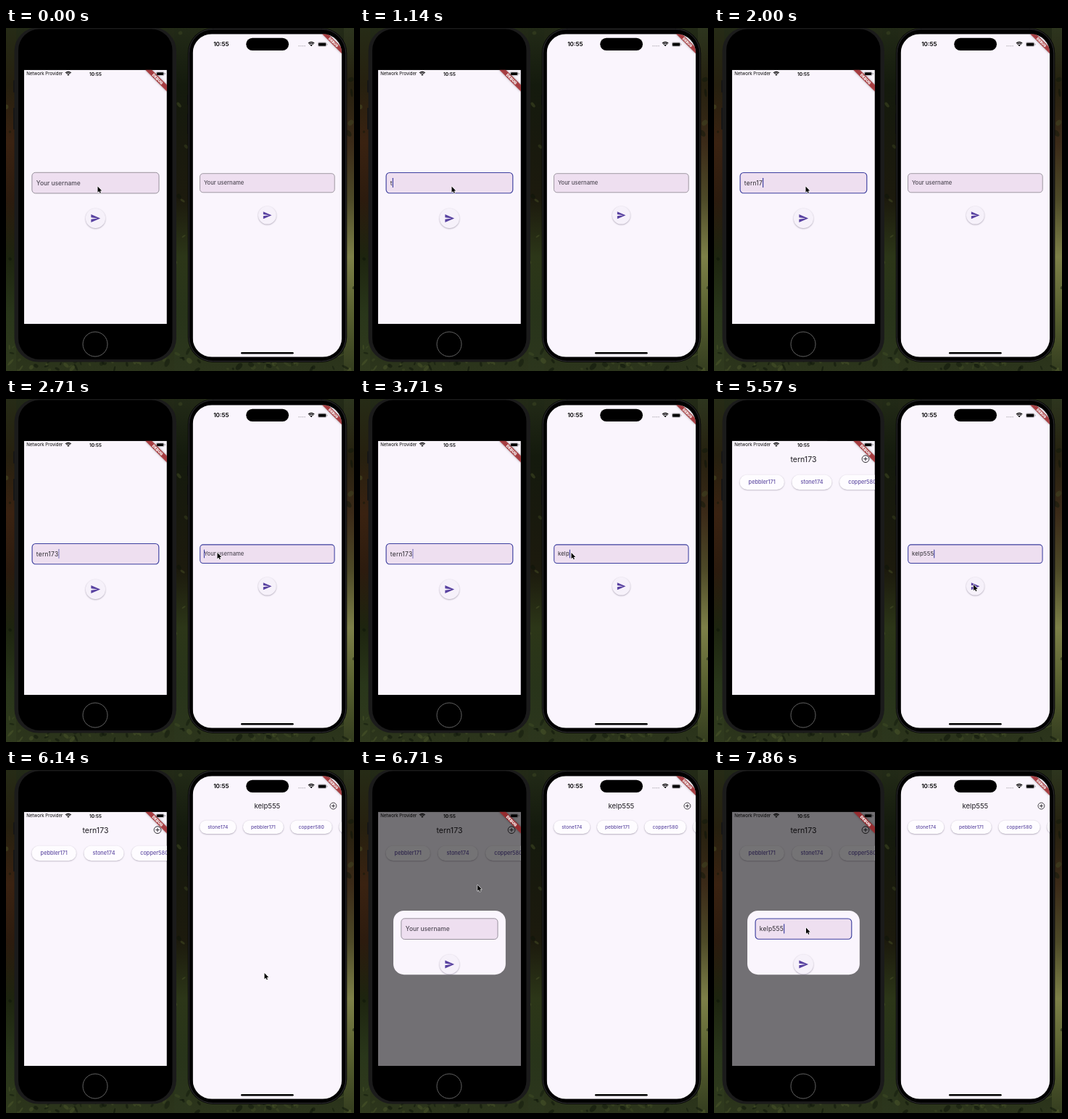
These frames come from a looping animation (480 by 473 pixels, 8000 ms). An HTML page with a canvas:

```html
<!DOCTYPE html>
<html lang="en">
<head>
<meta charset="utf-8">
<title>Two phones signing in</title>
<style>
  html, body { margin: 0; width: 100%; height: 100%; overflow: hidden; background: #14180c; }
  canvas { display: block; width: 480px; height: 473px; }
</style>
</head>
<body>
<canvas id="stage"></canvas>
<script>
const W = 480, H = 473, LOOP = 8000;
const canvas = document.getElementById('stage');
const ctx = canvas.getContext('2d');
const dpr = window.devicePixelRatio || 1;
canvas.width = W * dpr;
canvas.height = H * dpr;

const PAPER = '#faf5fd', INK = '#1d1b20', PURPLE = '#5841a0', INDIGO = '#3d3f9f';
const USERS = { a: 'tern173', b: 'kelp555' };
const CHIPS = { pebble: ['pebbler171', 117], stone: ['stone174', 105], copper: ['copper580', 120] };
const SEND = new Path2D('M2 21L23 12 2 3v7l15 2-15 2z');
const ARROW = new Path2D('M0 0V8.2L1.9 6.5 3.1 9.3 4.4 8.7 3.2 6H5.7Z');

// Phone screens: pixel origin, scale, and layout in points.
const PHONES = {
  left: { x: 25, y: 57.7, s: .525, w: 375, h: 667, r: 0, top: 20, fieldY: 269,
          user: USERS.a, input: { focus: 450, start: 1080, step: 178 }, push: 5120,
          chips: [CHIPS.pebble, CHIPS.stone, CHIPS.copper] },
  right: { x: 257.6, y: 8.2, s: .478, w: 430, h: 932, r: 55, top: 59, fieldY: 402,
           user: USERS.b, input: { focus: 2580, start: 3080, step: 190 }, push: 5580,
           chips: [CHIPS.stone, CHIPS.pebble, CHIPS.copper, ['', 105]] }
};
const DIALOG = { open: 6560, input: { focus: 6840, start: 6900, step: 145 } };

// Pointer tip: time, x, y
const POINTER = [
  [0, 126.5, 218.5], [2200, 126.5, 218.5], [2540, 291.5, 212], [4300, 291.5, 212],
  [4800, 128.5, 261.5], [5140, 128.5, 261.5], [5480, 358, 256], [5640, 358, 256],
  [5900, 356.5, 280], [6150, 356.5, 280], [6470, 208.5, 81], [6580, 208.5, 81],
  [6820, 127, 217.5], [LOOP, 127, 217.5]
];

const clamp = v => Math.max(0, Math.min(1, v));
const smooth = p => p * p * (3 - 2 * p);
const typed = (text, t, { start, step }) =>
  t < start ? '' : text.slice(0, Math.floor((t - start) / step) + 1);

// One-second blink that restarts on focus and on every key press.
function caretAlpha(t, value, { focus, start, step }) {
  const restart = value ? start + (value.length - 1) * step : focus;
  const phase = (t - restart) / 1000 % 1;
  return clamp((Math.abs(phase - .75) - .1) / .15);
}

function within(draw) {
  ctx.save();
  draw();
  ctx.restore();
}

function box(x, y, w, h, r, fill, stroke, line = 1) {
  ctx.beginPath();
  ctx.roundRect(x, y, w, h, r);
  if (fill) { ctx.fillStyle = fill; ctx.fill(); }
  if (stroke) { ctx.strokeStyle = stroke; ctx.lineWidth = line; ctx.stroke(); }
}

function raised(x, y, w, h, fill) {
  within(() => {
    ctx.shadowColor = 'rgba(40,30,60,.38)';
    ctx.shadowBlur = 2 * dpr;
    ctx.shadowOffsetY = .7 * dpr;
    box(x, y, w, h, h / 2, fill);
  });
}

function label(text, x, y, size, weight = 400, color = INK, align = 'left', spacing = 0) {
  ctx.font = `${weight} ${size}px Inter, Roboto, sans-serif`;
  ctx.letterSpacing = spacing + 'px';
  ctx.textAlign = align;
  ctx.textBaseline = 'alphabetic';
  ctx.fillStyle = color;
  ctx.fillText(text, x, y + size * .36);
  return ctx.measureText(text).width;
}

function field(x, y, w, text, t, input) {
  const focused = t >= input.focus, value = typed(text, t, input);
  const line = focused ? 2.2 : 1.4;
  box(x + line / 2, y + line / 2, w - line, 56 - line, 9, '#eedff0', focused ? INDIGO : '#77727c', line);
  const width = value
    ? label(value, x + 12, y + 28, 16, 400, '#29262d', 'left', .5)
    : (label('Your username', x + 12, y + 28, 16, 500, '#514b57'), 0);
  if (!focused) return;
  within(() => {
    ctx.globalAlpha *= caretAlpha(t, value, input);
    box(x + 12 + width, y + 15, 2.2, 25, 1, INDIGO);
  });
}

function sendButton(x, y) {
  raised(x - 26, y - 26, 52, 52, '#f6f1fa');
  within(() => {
    ctx.translate(x, y);
    ctx.scale(1.16, 1.16);
    ctx.translate(-12, -12);
    ctx.fillStyle = PURPLE;
    ctx.fill(SEND);
  });
}

function loginPage(p, t) {
  box(0, 0, p.w, p.h, 0, PAPER);
  field(20, p.fieldY, p.w - 40, p.user, t, p.input);
  sendButton(p.w / 2, p.fieldY + 121);
}

function homePage(p) {
  box(0, 0, p.w, p.h, 0, PAPER);
  label(p.user, p.w / 2, p.top + 28, 20, 400, INK, 'center');
  const px = p.w - 24.5, py = p.top + 27.5;
  ctx.strokeStyle = INK;
  ctx.lineWidth = 1.7;
  ctx.beginPath();
  ctx.arc(px, py, 9.3, 0, 7);
  ctx.moveTo(px - 5, py); ctx.lineTo(px + 5, py);
  ctx.moveTo(px, py - 5); ctx.lineTo(px, py + 5);
  ctx.stroke();
  let x = 20;
  for (const [name, w] of p.chips) {
    raised(x, p.top + 69, w, 39, '#fefcff');
    label(name, x + w / 2, p.top + 88.5, 14, 500, '#6350a5', 'center');
    x += w + 20;
  }
}

function dialog(p, t) {
  const shown = clamp((t - DIALOG.open) / 150);
  if (!shown) return;
  within(() => {
    ctx.globalAlpha = shown;
    box(0, 0, p.w, p.h, 0, 'rgba(0,0,0,.54)');
    box(40, 259.5, 295, 168, 28, PAPER);
    field(60, 279.5, 255, USERS.b, t, DIALOG.input);
    sendButton(p.w / 2, 400.5);
  });
}

function banner(p) {
  within(() => {
    ctx.translate(p.w, 0);
    ctx.rotate(Math.PI / 4);
    ctx.shadowColor = 'rgba(0,0,0,.5)';
    ctx.shadowBlur = 3 * dpr;
    box(-40, 28, 80, 12, 0, 'rgba(168,38,42,.8)');
    ctx.shadowColor = 'transparent';
    label('DEBUG', 0, 34, 10.2, 900, '#fff', 'center');
  });
}

function wifi(x, y, size) {
  within(() => {
    ctx.translate(x, y + size * .42);
    ctx.strokeStyle = ctx.fillStyle = '#000';
    ctx.lineWidth = size * .19;
    for (const r of [.9, .6]) {
      ctx.beginPath();
      ctx.arc(0, 0, size * r, -Math.PI * .75, -Math.PI * .25);
      ctx.stroke();
    }
    ctx.beginPath();
    ctx.moveTo(0, 0);
    ctx.arc(0, 0, size * .37, -Math.PI * .75, -Math.PI * .25);
    ctx.fill();
  });
}

function battery(x, y, w, h) {
  box(x, y, w, h, 3.5, null, 'rgba(0,0,0,.4)', 1);
  box(x + 1.6, y + 1.6, w - 3.2, h - 3.2, 2, '#000');
  box(x + w + 1.2, y + h / 2 - 2, 1.5, 4, 1, 'rgba(0,0,0,.45)');
}

function leftStatus() {
  label('Network Provider', 6, 10.5, 11.6, 400, '#000');
  wifi(116, 10.5, 11.5);
  label('10:55', 187.5, 10.5, 12.3, 600, '#000', 'center');
  battery(347, 5, 21, 10.5);
}

function rightStatus() {
  label('10:55', 82, 30, 17, 600, '#000', 'center');
  box(154, 11.5, 123, 36, 18, '#000');
  for (let i = 0; i < 4; i++) box(305 + i * 5.5, 33, 3.4, 3.4, 1.7, '#b4b0b8');
  wifi(342, 30, 13.5);
  battery(361, 24, 25, 12);
  box(139, 918, 152, 5, 2.5, '#000');
}

function screen(p, t, status) {
  within(() => {
    ctx.translate(p.x, p.y);
    ctx.scale(p.s, p.s);
    ctx.beginPath();
    ctx.roundRect(0, 0, p.w, p.h, p.r);
    ctx.clip();
    const slide = 1 - (1 - clamp((t - p.push) / 500)) ** 5;
    if (slide < 1) within(() => { ctx.translate(-p.w / 3 * slide, 0); loginPage(p, t); });
    if (slide > 0) within(() => { ctx.translate(p.w * (1 - slide), 0); homePage(p); });
    if (p === PHONES.left) dialog(p, t);
    banner(p);
    status();
  });
}

function gradient(x, y, w, h, colors) {
  const g = ctx.createLinearGradient(0, y, 0, y + h);
  colors.forEach((c, i) => g.addColorStop(i / (colors.length - 1), c));
  ctx.fillStyle = g;
  ctx.fillRect(x, y, w, h);
}

function forest() {
  gradient(0, 0, W, H, ['#232a17', '#191d0f', '#1c1a0e', '#1b2010', '#232c13', '#2c351c']);
  gradient(0, 0, 14, H, ['#262b16', '#26200f', '#3a2211', '#2c1b0e', '#1d240f', '#29361a', '#303a1e']);
  gradient(232, 0, 22, H, ['#222a17', '#141a0d', '#18190d', '#1c1a0d', '#2c3618', '#28341a', '#2c361d']);
  gradient(466, 0, 14, H, ['#2d351e', '#25200f', '#3b2a18', '#4e4a28', '#7d8048', '#586030', '#343d1f']);
  let seed = 11;
  const random = () => (seed = seed * 16807 % 2147483647) / 2147483647;
  for (let i = 0; i < 260; i++) {
    const y = i % 2 ? random() * 400 : 440 + random() * 33;
    ctx.fillStyle = ['#4a562a55', '#5d693455', '#0d140988', '#10180a77'][(i >> 1) % 4];
    ctx.beginPath();
    ctx.ellipse(random() * W, y, 1 + random() * 5, 1 + random() * 2.5, random() * 3, 0, 7);
    ctx.fill();
  }
}

function bodies() {
  box(10, 72, 3, 17, 1, '#151515');
  box(10, 110, 3, 30, 1, '#151515');
  box(11.5, -1, 223.5, 461.5, 33, '#1b1b1b');
  box(17, 1.5, 212.5, 455.5, 29, '#000');
  ctx.beginPath();
  ctx.arc(123, 436, 17, 0, 7);
  ctx.strokeStyle = '#626262';
  ctx.lineWidth = 1;
  ctx.stroke();

  box(250, 92, 3, 14, 1, '#111');
  box(250, 118, 3, 28, 1, '#111');
  box(250.8, 0, 219.5, 461, 35, '#050505');
  box(252.2, 1.4, 216.6, 458.2, 33.5, null, '#3c3c3e', .8);
  box(254, 3.2, 213, 454.6, 32, '#000');
}

function pointer(t) {
  const i = POINTER.findIndex(k => k[0] > t);
  const [t0, x0, y0] = POINTER[i - 1], [t1, x1, y1] = POINTER[i];
  const p = smooth((t - t0) / (t1 - t0));
  within(() => {
    ctx.translate(x0 + (x1 - x0) * p, y0 + (y1 - y0) * p);
    ctx.strokeStyle = 'rgba(255,255,255,.9)';
    ctx.lineWidth = 1.2;
    ctx.lineJoin = 'round';
    ctx.stroke(ARROW);
    ctx.fillStyle = '#000';
    ctx.fill(ARROW);
  });
}

function render(now) {
  const t = now % LOOP;
  ctx.setTransform(dpr, 0, 0, dpr, 0, 0);
  forest();
  bodies();
  screen(PHONES.left, t, leftStatus);
  screen(PHONES.right, t, rightStatus);
  pointer(t);
}

const begin = performance.now();
function tick() {
  render(performance.now() - begin);
  requestAnimationFrame(tick);
}
tick();
</script>
</body>
</html>
```
